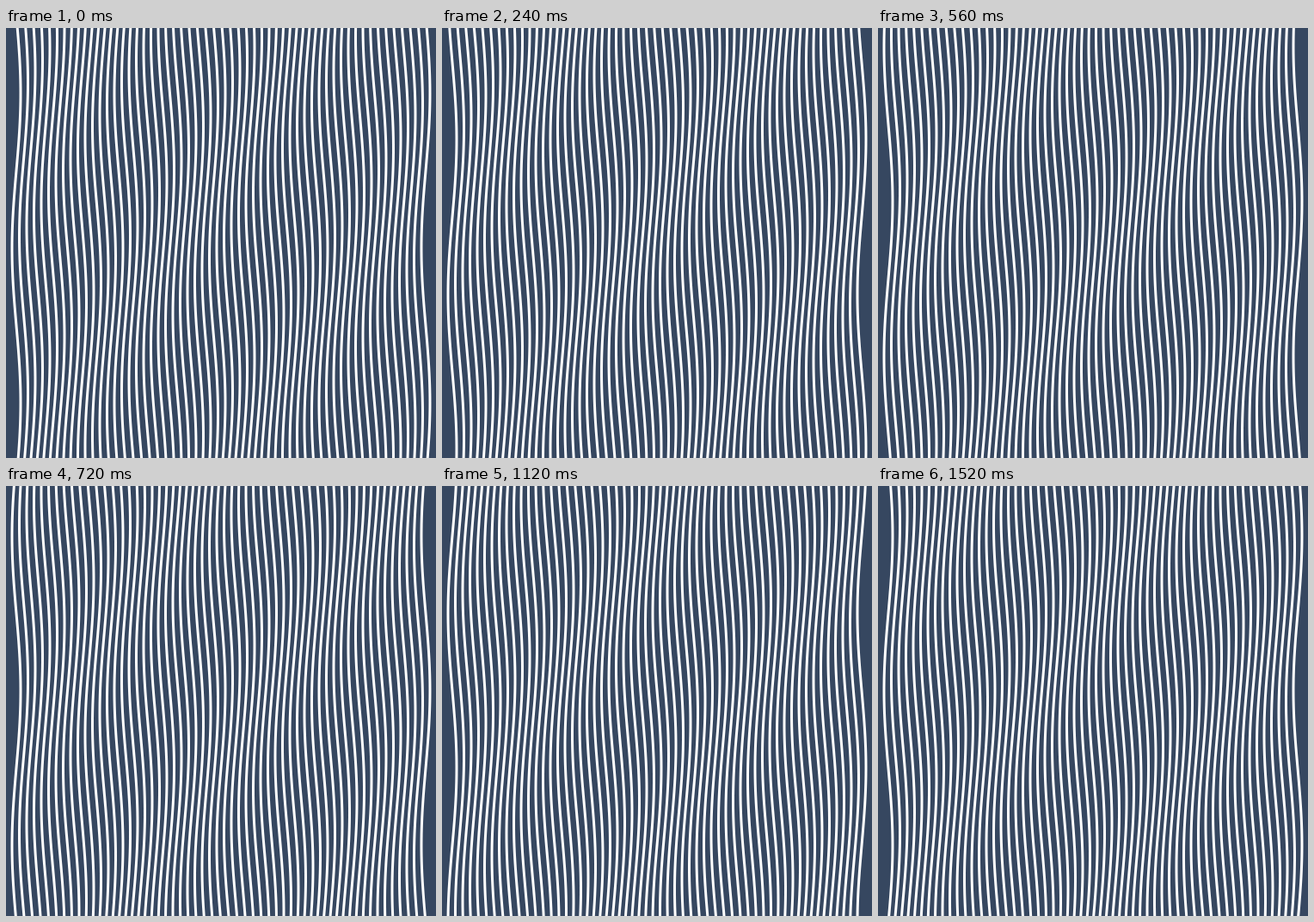
Write an HTML page with a canvas that moves like this. It is 500 by 500 pixels and loops after 1.6 s.

```html
<!DOCTYPE html>
<html lang="en">
<head>
<meta charset="utf-8">
<title>Waving lines</title>
<style>
  html, body { margin: 0; width: 100%; height: 100%; overflow: hidden; background: #364760; }
  canvas { display: block; }
</style>
</head>
<body>
<canvas id="stage" width="500" height="500"></canvas>
<script>
const ctx = document.getElementById('stage').getContext('2d');
const SIZE = 500;
const LOOP = 1600, STEPS = 20;
const LINES = 57, LINES_PER_WAVE = 28;
const LEFT = 12, SPACING = 8.5;
const AMPLITUDE = 5, WAVE_HEIGHT = 360, FIRST_CREST = 76;
const TAU = Math.PI * 2;

function lineX(index, y, progress) {
  const turns = (y - FIRST_CREST) / WAVE_HEIGHT + index / LINES_PER_WAVE - progress;
  return LEFT + SPACING * index + AMPLITUDE * Math.cos(TAU * turns);
}

function draw(progress) {
  ctx.fillStyle = '#364760';
  ctx.fillRect(0, 0, SIZE, SIZE);
  ctx.strokeStyle = '#fff';
  ctx.lineWidth = 3;
  ctx.lineJoin = 'round';
  ctx.beginPath();
  for (let i = 0; i < LINES; i++) {
    ctx.moveTo(lineX(i, -5, progress), -5);
    for (let y = 0; y <= SIZE + 5; y += 5) ctx.lineTo(lineX(i, y, progress), y);
  }
  ctx.stroke();
}

const start = performance.now();

function tick() {
  const elapsed = (performance.now() - start) % LOOP;
  draw(Math.floor(elapsed / LOOP * STEPS) / STEPS);
  requestAnimationFrame(tick);
}
tick();
</script>
</body>
</html>
```
